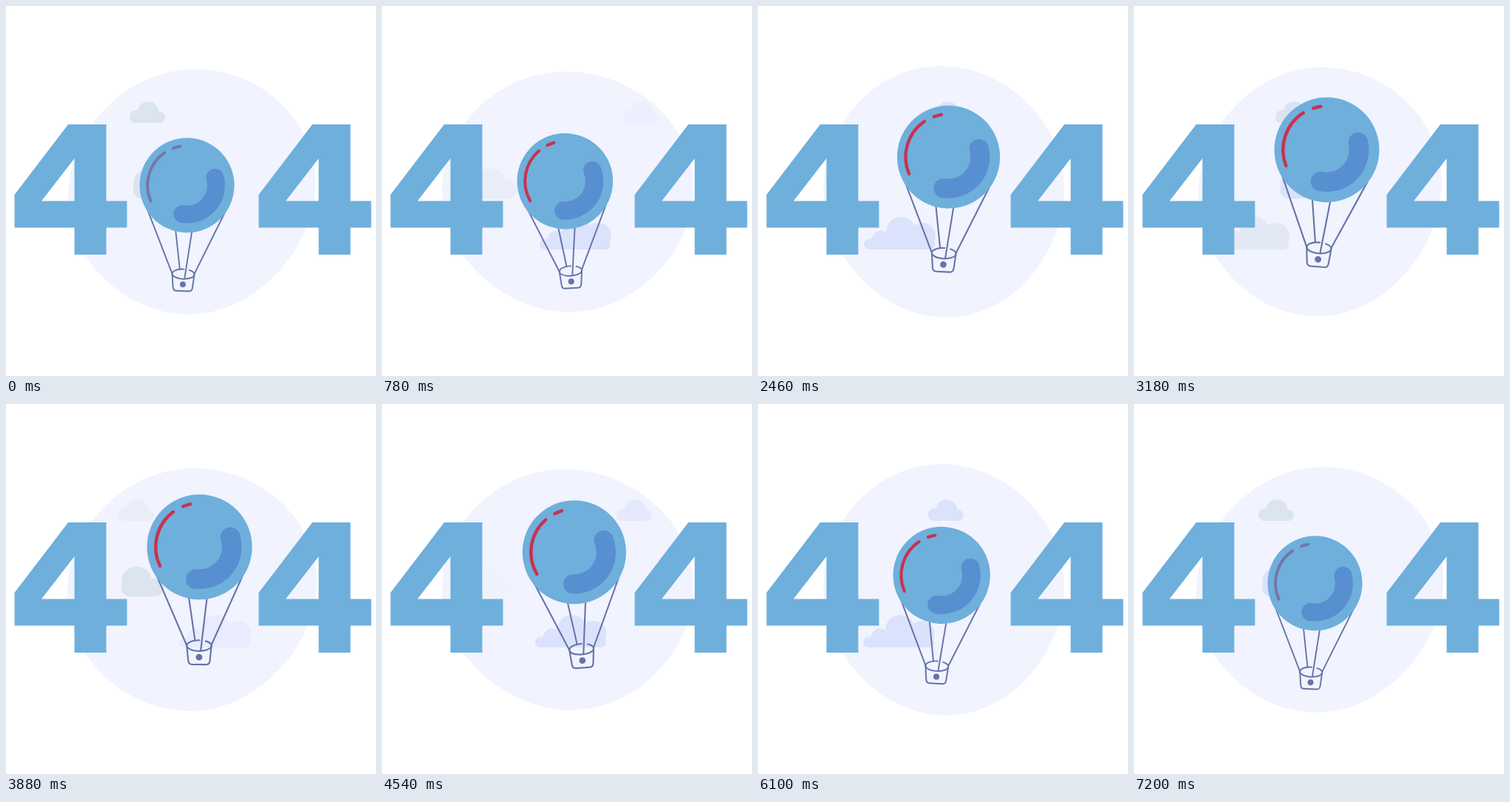
Recreate the animation shown at these times as an HTML page. Size 500 px wide and 500 px high, loop 7220 ms.

```html
<!DOCTYPE html>
<html lang="en">
<head>
<meta charset="utf-8">
<title>404</title>
<style>
  html, body { margin: 0; width: 100%; height: 100%; overflow: hidden; background: #fff; }
  svg { display: block; width: 100vw; height: 100vh; }
  .line { fill: none; stroke: #6374a8; stroke-width: 1.9; stroke-linecap: round; stroke-linejoin: round; }
  .round { fill: none; stroke-linecap: round; }
</style>
</head>
<body>
<svg viewBox="0 0 500 500" role="img" aria-label="404">
  <defs>
    <path id="four" fill="#6fafdc" fill-rule="evenodd"
      d="M84 160H135.5V263.5H163.5V299.5H135.5V336H92.5V299.5H11.5V255ZM92.5 206V263.5H48Z"/>
  </defs>
  <path id="blob" fill="#f1f3fe"/>
  <g id="clouds"></g>
  <use href="#four"/>
  <use href="#four" x="330"/>
  <g id="balloon">
    <g class="line">
      <path d="M-52 35L-15 120M52.5 35L15 119M-13 60L-5 113.5M9.5 60L2 126"/>
      <path id="rim"/>
      <path d="M-15 120L-13.2 138Q-12.8 143 -8.5 143H8.5Q12.8 143 13.2 138L15 120"/>
    </g>
    <circle cy="134" r="4" fill="#6374a8"/>
    <circle r="64" fill="#6fafdc"/>
    <path id="shade" class="round" stroke="#588fd0" stroke-width="24"/>
    <path id="shine" class="round" stroke-width="4"/>
  </g>
</svg>
<script>
const LOOP = 7220, HALF = LOOP / 2, TAU = Math.PI * 2, DEG = TAU / 360;
const { sin, cos } = Math;
const $ = id => document.getElementById(id);
const clamp = v => Math.max(0, Math.min(1, v));
const mod = (a, n) => ((a % n) + n) % n;

// Clockwise arc between two angles in degrees
function arc(rx, ry, from, to, cy = 0) {
  const point = deg => `${rx * cos(deg * DEG)} ${ry * sin(deg * DEG) + cy}`;
  return `M${point(from)}A${rx} ${ry} 0 ${to - from > 180 ? 1 : 0} 1 ${point(to)}`;
}

$('rim').setAttribute('d', arc(15, 6.6, -58, 272, 120));
$('shade').setAttribute('d', arc(39.3, 39.3, -18, 96.5));
$('shine').setAttribute('d', arc(53.4, 53.4, 154, 233) + arc(53.4, 53.4, 247.4, 257.6));

// A circle with a turning oval wave and two small fixed waves
function drawBlob(t) {
  const turn = TAU * t / HALF - 80 * DEG;
  const points = [];
  for (let deg = 0; deg < 360; deg += 3) {
    const a = deg * DEG;
    const r = 165.2 + 3.7 * cos(2 * a - turn) - sin(3 * a) + 1.1 * cos(4 * a + 0.5);
    points.push(`${251 + r * cos(a)} ${250 + r * sin(a)}`);
  }
  $('blob').setAttribute('d', `M${points.join('L')}Z`);
}

// Bumps are [x, y, r] from the left end of a rounded bar
const CLOUDS = [
  { base: 260, width: 58, bar: 24, start: 1100, x: 322.4, speed: 60,
    bumps: [[21, 240, 20.5]] },
  { base: 158, width: 48, bar: 15, start: 600, x: 335.6, speed: 56,
    bumps: [[8.5, 149.5, 8.5], [25, 143.5, 14.5]] },
  { base: 329, width: 96, bar: 14, start: 0, x: 245.5, speed: 41.5,
    bumps: [[23, 316, 12.5], [50, 305, 20], [79, 310.5, 17.5]] }
];

function cloudPath({ base, width, bar, bumps }) {
  const r = bar / 2, top = base - bar, right = width - r;
  return `M${r} ${base}A${r} ${r} 0 0 1 ${r} ${top}H${right}A${r} ${r} 0 0 1 ${right} ${base}Z` +
    bumps.map(([x, y, q]) =>
      `M${x - q} ${y}a${q} ${q} 0 0 1 ${2 * q} 0a${q} ${q} 0 0 1 ${-2 * q} 0Z`).join('');
}

for (const cloud of CLOUDS) {
  cloud.el = document.createElementNS('http://www.w3.org/2000/svg', 'path');
  cloud.el.setAttribute('d', cloudPath(cloud));
  $('clouds').append(cloud.el);
}

// Each cloud fades in, drifts left, turns grey late and fades out
function drawCloud({ el, start, x, speed }, t) {
  const age = mod(t - start, HALF);
  el.setAttribute('transform', `translate(${x - speed * age / 1000} 0)`);
  el.setAttribute('opacity', clamp(Math.min(age / 620, (3500 - age) / 500)));
  el.setAttribute('fill', age > 2500 ? '#dce4f0' : '#dbe2fc');
}

function drawBalloon(t) {
  const rise = (1 - cos(TAU * t / LOOP)) / 2;
  const swing = 4.8 * sin(TAU * (t - 300) / HALF);
  const x = 244.9 + 16.9 * rise + 0.15 * swing;
  const y = 242.3 - 49.7 * rise;
  const size = 1 + 0.112 * rise;
  $('balloon').setAttribute('transform',
    `translate(${x} ${y}) rotate(${-swing}) scale(${size})`);
  $('shine').setAttribute('stroke', rise < 0.017 ? '#7576aa' : '#c8324f');
}

function draw(t) {
  drawBlob(t);
  CLOUDS.forEach(cloud => drawCloud(cloud, t));
  drawBalloon(t);
}

const begin = performance.now();
function tick() {
  draw(mod(performance.now() - begin, LOOP));
  requestAnimationFrame(tick);
}
tick();
</script>
</body>
</html>
```
